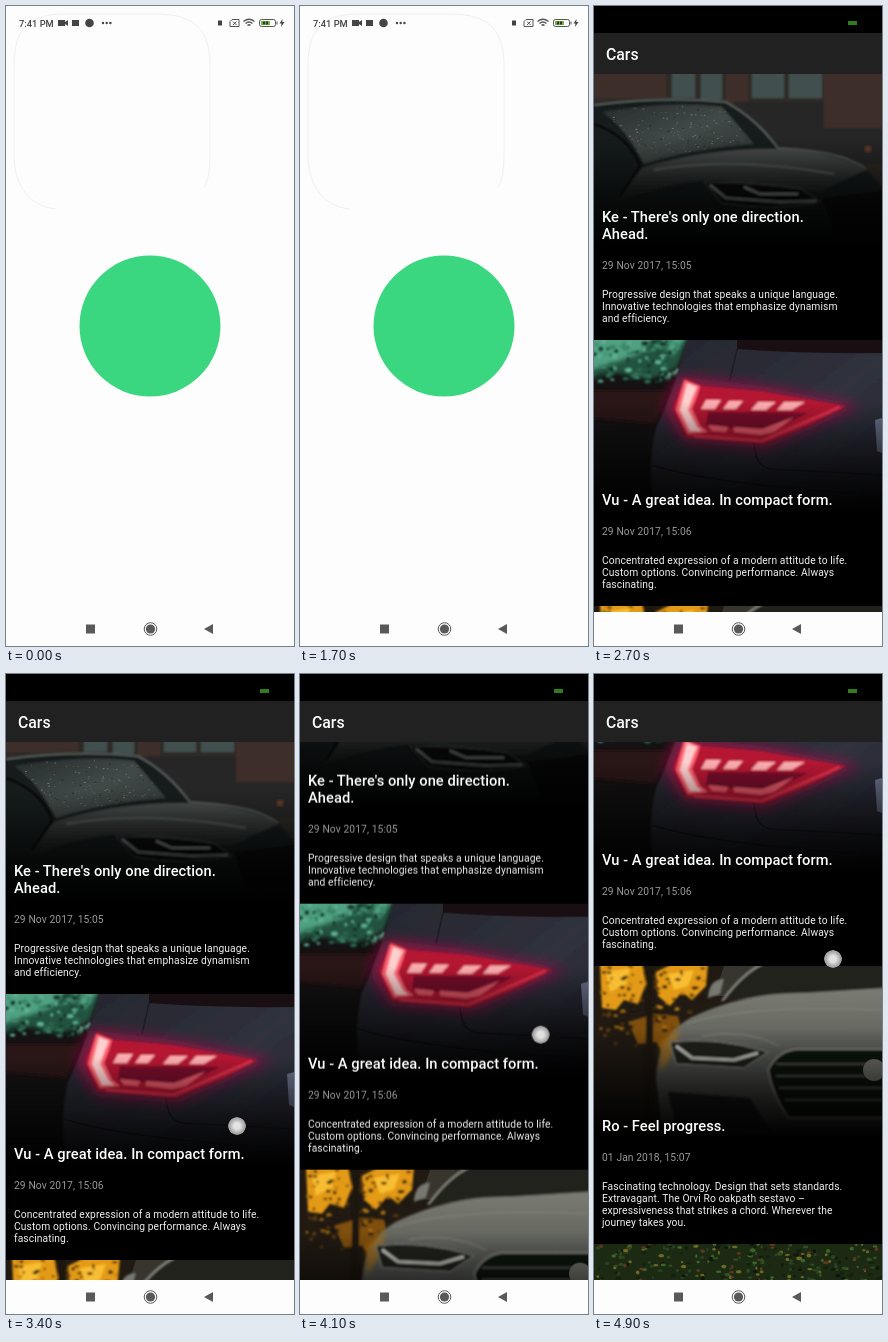
Write an HTML page that moves like this. It is 288x640 px and loops after 5000 ms.

```html
<!DOCTYPE html>
<html lang="en">
<head>
<meta charset="utf-8">
<title>Cars</title>
<style>
html, body { margin: 0; width: 100%; height: 100%; overflow: hidden; background: #fff; }
#stage { position: relative; width: 288px; height: 640px; overflow: hidden; background: #000; font-family: Roboto, sans-serif; white-space: nowrap; }
#stage > * { position: absolute; left: 0; }
svg { display: block; }
p { margin: 0; position: absolute; left: 8px; }

#splash, #list, #scroll, #touch { animation: 5s -5ms infinite step-end; }
#splash { top: 0; animation-name: leave; }
#clock { font-weight: 500; font-size: 9.3px; fill: #444; }

#bar { top: 27px; width: 288px; height: 41px; background: #212121; color: #fff; font-weight: 500; font-size: 15.8px; line-height: 43px; text-indent: 12px; }
#battery { top: 15px; margin-left: 254px; width: 9px; height: 4px; background: #2f7d1c; }
#list { top: 68px; width: 288px; height: 538px; overflow: hidden; animation-name: enter; }
#scroll { animation-name: scroll; }
#nav { top: 606px; background: #fdfdfd; }

.item { position: relative; height: 266px; background: #000; }
.long { height: 278px; }
.title { top: 101px; height: 68.6px; display: flex; align-items: flex-end; color: #fff; font-weight: 500; font-size: 14.67px; letter-spacing: .05px; line-height: 17.2px; }
.date, .text { font-size: 10.27px; letter-spacing: .1px; }
.date { top: 185.7px; color: #999; line-height: 12px; }
.text { top: 214.5px; color: #f0f0f0; line-height: 12.3px; }

#touch { top: 0; width: 18px; height: 18px; margin: -9px; border-radius: 50%; background: radial-gradient(#efefef 25%, #c8c8c8 45%, #a2a2a2 68%, #a2a2a200 72%); animation-name: touch; }

@keyframes leave { 0% { opacity: 1 } 36%, 100% { opacity: 0 } }
@keyframes enter { 0% { opacity: 0 } 40%, 100% { opacity: 1 } }
@keyframes scroll {
  0% { transform: none }
  62% { transform: translateY(0); animation-timing-function: steps(3) }
  68% { transform: translateY(-14px); animation-timing-function: steps(3) }
  74% { transform: translateY(-38px); animation-timing-function: steps(2) }
  78% { transform: translateY(-61px); animation-timing-function: steps(3) }
  84% { transform: translateY(-126px); animation-timing-function: steps(2) }
  88% { transform: translateY(-185px); animation-timing-function: steps(3) }
  94% { transform: translateY(-256px); animation-timing-function: steps(2) }
  98%, 100% { transform: translateY(-308px) }
}
@keyframes touch {
  0% { transform: translate(229px, 468px); opacity: 0 }
  62% { transform: translate(229px, 468px); opacity: .95; animation-timing-function: steps(3) }
  68% { transform: translate(231px, 452px); opacity: .95; animation-timing-function: steps(3) }
  74% { transform: translate(234px, 428px); opacity: .95; animation-timing-function: steps(2) }
  78% { transform: translate(236px, 404px); opacity: .95; animation-timing-function: steps(3) }
  84% { transform: translate(243px, 339px); opacity: .95; animation-timing-function: steps(2) }
  88% { transform: translate(248px, 298px); opacity: .5 }
  90% { transform: translate(240px, 337px); opacity: 0 }
  94% { transform: translate(240px, 337px); opacity: .95; animation-timing-function: steps(2) }
  98%, 100% { transform: translate(239px, 285px); opacity: .95 }
}
</style>
</head>
<body>
<div id="stage">
  <div id="battery"></div>
  <div id="list"><div id="scroll">

    <div class="item">
      <svg width="288" height="176">
        <defs>
          <linearGradient id="fade" x2="0" y2="1">
            <stop offset=".35" stop-opacity="0"/><stop offset=".75" stop-opacity=".68"/><stop offset=".98"/>
          </linearGradient>
          <linearGradient id="glass" x2="1" y2="1"><stop stop-color="#262c2c"/><stop offset=".5" stop-color="#414947"/><stop offset="1" stop-color="#2c3231"/></linearGradient>
          <linearGradient id="hood" x2="0" y2="1"><stop stop-color="#4b504e"/><stop offset=".5" stop-color="#303433"/><stop offset="1" stop-color="#191b1a"/></linearGradient>
          <linearGradient id="tail" x2="1" y2="1"><stop stop-color="#25262d"/><stop offset=".55" stop-color="#30313d"/><stop offset="1" stop-color="#24252f"/></linearGradient>
          <linearGradient id="silver" x2="0" y2="1"><stop stop-color="#7b7c72"/><stop offset=".4" stop-color="#5d5f59"/><stop offset="1" stop-color="#3c3e3b"/></linearGradient>
          <filter id="fine" x="-20%" y="-20%" width="140%" height="140%"><feGaussianBlur stdDeviation=".8"/></filter>
          <filter id="soft" x="-30%" y="-30%" width="160%" height="160%"><feGaussianBlur stdDeviation="2"/></filter>
          <filter id="glow" x="-30%" y="-50%" width="160%" height="200%"><feGaussianBlur stdDeviation="7"/></filter>
          <clipPath id="shield"><path d="M8 38Q80 26 128 33L160 70Q100 74 50 90Q32 54 8 38z"/></clipPath>
        </defs>
        <g filter="url(#fine)">
          <path fill="#2d2a28" d="M-5-5H293V176H-5z"/>
          <path fill="#3d2e2a" d="M0-3H72V24H0zM132-3H154V28H132zM230-3H292V54H230z"/>
          <path fill="#43504f" d="M78-3H101V24H78zM107-3H128V26H107zM158-3H190V24H158zM195-3H228V24H195z"/>
          <path fill="#262827" d="M140 28H230V54H292V90H150z"/>
        </g>
        <circle cx="274" cy="75" r="2.5" fill="#b4562c" filter="url(#soft)"/>
        <g filter="url(#fine)">
          <path fill="#191c1b" d="M-3 31Q70 22 132 28Q162 44 184 74Q250 76 272 95L292 118V180H-3z"/>
          <path fill="url(#glass)" d="M8 38Q80 26 128 33L160 70Q100 74 50 90Q32 54 8 38z"/>
          <path fill="url(#hood)" d="M48 94Q110 74 184 75Q244 78 272 96L225 118L120 106Q70 108 20 130z"/>
          <path fill="none" stroke="#626a68" stroke-width="1.5" d="M0 31Q70 22 132 28Q162 44 184 74Q250 77 272 95M60 96Q140 82 240 100"/>
          <path fill="#0b0d0d" stroke="#4c5250" d="M110 108Q165 108 208 115L226 128Q180 138 128 129z"/>
          <path fill="none" stroke="#8d9492" stroke-width="2" d="M116 111L132 124L186 128L222 127M150 113L166 120H204"/>
          <path fill="#0c0e0e" d="M228 124L292 116V160H240z"/>
          <path fill="none" stroke="#0a0c0c" stroke-width="3" d="M0 50Q35 62 46 92L26 122"/>
        </g>
        <g id="drops" clip-path="url(#shield)"></g>
        <path fill="url(#fade)" d="M0 0H288V176H0z"/>
      </svg>
      <p class="title">Ke - There's only one direction.<br>Ahead.</p>
      <p class="date">29 Nov 2017, 15:05</p>
      <p class="text">Progressive design that speaks a unique language.<br>Innovative technologies that emphasize dynamism<br>and efficiency.</p>
    </div>

    <div class="item">
      <svg width="288" height="176">
        <path fill="#141213" d="M0 0H288V176H0z"/>
        <g filter="url(#soft)">
          <path fill="#22533f" d="M-5-5H96L84 26Q60 44 36 36T-5 42z"/>
          <path fill="#4fa182" d="M-4-4H62L44 14L20 22L-4 30zM66-4H92L78 16z"/>
        </g>
        <g id="hedge" filter="url(#fine)"></g>
        <path fill="#2c1518" filter="url(#soft)" d="M-4 50H74L62 84L-4 78z"/>
        <path fill="url(#tail)" filter="url(#fine)" d="M94-3H292V180H62Q52 130 62 88Q80 50 94-3z"/>
        <path fill="#190f13" d="M143 0H288V13Q210 14 143 9z"/>
        <path fill="none" stroke="#1a1c25" stroke-width="1.5" d="M143 9L136 40M160 100Q160 126 176 129L288 135M58 125Q120 145 288 155"/>
        <path fill="#b01048" opacity=".75" filter="url(#glow)" d="M84 36L70 70L90 102L172 109L222 86L266 66L166 46z"/>
        <g filter="url(#fine)">
          <path fill="#b51233" d="M91 38L79 68L92 97L170 104L218 84L252 66L166 51L108 46z"/>
          <path fill="#74112a" d="M114 72L112 86L176 91L214 73z"/>
          <path fill="none" stroke="#e3324c" stroke-width="3" d="M100 96L168 101L214 81L246 67"/>
          <path fill="#ff6472" d="M90 40L106 46L103 56L98 69L106 86L114 92L94 94L82 70z"/>
          <path fill="#ffd0cf" d="M93 43L103 47L99 56L94 70L103 87L108 91L96 91L86 70z"/>
          <path fill="#ffadb1" d="M112 60h15l-6 9h-14zM135 61h14l-7 8h-13zM164 62h18l-10 8h-15zM190 62h21l-13 8h-15z"/>
          <path fill="#ea5a6b" d="M114 85L134 87L132 92L118 91zM140 87L168 89L200 77L180 92L166 95L140 92z"/>
        </g>
        <path fill="#686f89" d="M281 80L288 78V113L283 111z"/>
        <path fill="url(#fade)" d="M0 0H288V176H0z"/>
      </svg>
      <p class="title">Vu - A great idea. In compact form.</p>
      <p class="date">29 Nov 2017, 15:06</p>
      <p class="text">Concentrated expression of a modern attitude to life.<br>Custom options. Convincing performance. Always<br>fascinating.</p>
    </div>

    <div class="item long">
      <svg width="288" height="176">
        <path fill="#211a13" d="M0 0H288V176H0z"/>
        <path fill="#38352e" d="M130 0H288V30H120z"/>
        <g filter="url(#fine)">
          <path fill="#e39a14" d="M6-3H48L52 18L44 38L30 34L22 44L8 42zM62 6L80-3H114L112 20L98 34L88 26L76 40L64 30z"/>
          <path fill="#f8bd30" d="M12 6L36 2L32 18L16 26zM74 8L100 4L94 20L80 24z"/>
          <path fill="#80500f" d="M34 56L60 48L84 50L88 66L70 88L62 76L44 78z"/>
          <g id="autumn"></g>
          <path fill="#1b140d" d="M53-3H60L58 176H50z"/>
        </g>
        <g filter="url(#fine)">
          <path fill="#22241f" d="M128 35Q148 5 166-3H292V30Q200 24 128 35z"/>
          <path fill="none" stroke="#8a8c82" stroke-width="2" d="M128 35Q148 8 168-2"/>
          <path fill="#777970" d="M114 32Q115 13 130 13L126 28z"/>
          <path fill="url(#silver)" d="M62 112Q64 70 96 52Q150 26 210 27L292 22V180H70z"/>
          <path fill="none" stroke="#83857c" d="M92 58Q150 38 288 44M108 70Q150 62 186 80"/>
        </g>
        <path fill="#b57612" opacity=".65" filter="url(#soft)" d="M66 76L86 62L78 90L66 106z"/>
        <g filter="url(#fine)">
          <path fill="#20231f" stroke="#8b8e86" d="M76 76Q122 70 174 86L150 102L82 98z"/>
          <path fill="none" stroke="#d0d1c7" stroke-width="3" d="M82 80L98 92L140 94L164 87"/>
          <path fill="#111311" stroke="#82847c" stroke-width="2" d="M174 104Q184 84 204 83H292V152H194Q178 128 174 104z"/>
          <path stroke="#4d504b" stroke-width="2" d="M182 98H288M182 110H288M185 122H288M191 134H288"/>
          <path fill="#1a1c1a" d="M74 126L156 132L176 164L82 160z"/>
        </g>
        <circle cx="280" cy="104" r="11" fill="#777970"/>
        <path fill="url(#fade)" d="M0 0H288V176H0z"/>
      </svg>
      <p class="title">Ro - Feel progress.</p>
      <p class="date">01 Jan 2018, 15:07</p>
      <p class="text">Fascinating technology. Design that sets standards.<br>Extravagant. The Orvi Ro oakpath sestavo –<br>expressiveness that strikes a chord. Wherever the<br>journey takes you.</p>
    </div>

    <div class="item">
      <svg width="288" height="176"><path fill="#1c2a14" d="M0 0H288V176H0z"/><g id="leaves"></g></svg>
    </div>
  </div></div>

  <div id="bar">Cars</div>

  <svg id="splash" width="288" height="640">
    <path fill="#fdfdfd" d="M0 0H288V640H0z"/>
    <path fill="none" stroke="#f0f0ed" d="M50 203C20 200 8 175 8 150V60C8 20 25 8 60 8H150C190 8 204 25 204 60V150Q204 172 198 182"/>
    <circle cx="144" cy="320" r="70.5" fill="#3bd780"/>
    <text id="clock" x="13" y="20.6">7:41 PM</text>
    <g fill="#444">
      <path d="M52 14H59V16L62 14V20L59 18V20H52z"/>
      <path d="M66 14H73V20H66z"/>
      <circle cx="83.5" cy="17" r="4.3"/>
      <circle cx="97" cy="17" r="1.2"/><circle cx="100.7" cy="17" r="1.2"/><circle cx="104.4" cy="17" r="1.2"/>
      <path d="M212 14.5H216V19.5H212z"/>
      <path d="M276.5 13L273.5 17.5H275.5L275 21L278.5 16H276.3z"/>
    </g>
    <g fill="none" stroke="#555">
      <path d="M226 13.5H233V20.5H224V15.5zM227 15.5L230.5 19M230.5 15.5L227 19"/>
      <path stroke-width="1.3" d="M237.5 15.5Q243 11 248.5 15.5M239.5 17.5Q243 14.5 246.5 17.5M241.5 19.5Q243 18 244.5 19.5"/>
      <rect x="253.5" y="13.5" width="16" height="7" rx="2"/>
      <path d="M271 15.5V18.5"/>
    </g>
    <path fill="#70b63c" d="M255 15H264V19H255z"/>
    <path fill="#333" d="M257 15.5H259V18.5H257zM260 15.5H262V18.5H260z"/>
  </svg>

  <svg id="nav" width="288" height="34" viewBox="0 1 288 34">
    <g fill="#595959">
      <path d="M80 13.5H89V22.5H80zM198 18L207 13V23z"/>
      <circle cx="144.5" cy="18" r="4.6"/>
      <circle cx="144.5" cy="18" r="6.3" fill="none" stroke="#595959"/>
    </g>
  </svg>
  <div id="touch"></div>
</div>

<script>
let seed = 7;
const rand = n => (seed = seed * 16807 % 2147483647) / 2147483647 * n;

// Fills a box with seeded specks of the given tones
function scatter(id, count, size, [x, y, w, h], tones) {
  let specks = '';
  for (let i = 0; i < count; i++) {
    const tone = tones[Math.floor(rand(tones.length))];
    specks += `<ellipse cx="${x + rand(w)}" cy="${y + rand(h)}" rx="${size + rand(size * 2)}" ry="${size + rand(size)}" fill="${tone}"/>`;
  }
  document.getElementById(id).innerHTML = specks;
}

scatter('drops', 260, .4, [8, 26, 152, 64], ['#68716e', '#59625f', '#262c2b']);
scatter('hedge', 90, 1.2, [0, 0, 84, 42], ['#5fb394', '#2c6a50', '#173428', '#3c8568']);
scatter('autumn', 110, 1, [6, 0, 106, 80], ['#2a1e10', '#5c3b0e', '#b87a12', '#241a10']);
scatter('leaves', 420, 1, [0, 0, 288, 60], ['#2f4d1f', '#3e6428', '#15200e', '#0f160b', '#6d6a24', '#63351c', '#274420']);
</script>
</body>
</html>
```
